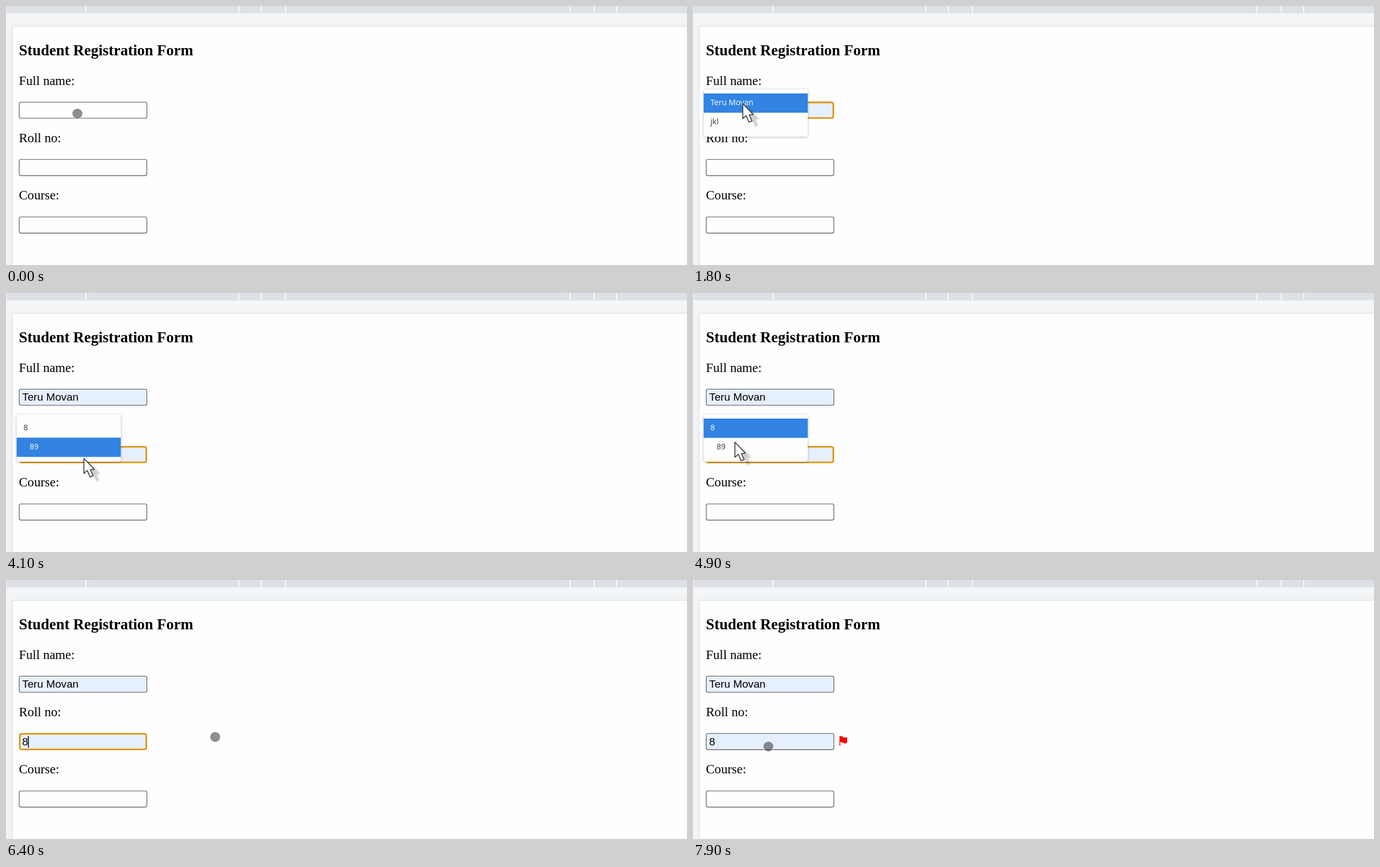
Animation of 1211x462 px, one loop 8000 ms. Source, as an HTML page with a canvas:

```html
<!DOCTYPE html>
<html lang="en">
<head>
<meta charset="utf-8">
<title>Student Registration Form</title>
<style>
  html, body { margin: 0; width: 100%; height: 100%; overflow: hidden; }
  canvas { display: block; }
</style>
</head>
<body>
<canvas id="stage" width="1211" height="462"></canvas>
<script>
const ctx = document.getElementById('stage').getContext('2d');
const LOOP = 8000, STEP = 100;
const SERIF = '"Liberation Serif", serif';
const SANS = '"Liberation Sans", sans-serif';
const MENU = '"Noto Sans", sans-serif';
const NAME = 'Teru Movan';
const FIELD_TOPS = [171.5, 273.8, 376.3];

// Pointer path: time, x, y
const PATH = [
  [0, 127, 192], [1700, 127, 192], [1800, 88, 174], [1900, 73, 173],
  [2500, 73, 173], [2900, 138, 294], [4100, 138, 295], [4200, 110, 276],
  [4400, 110, 276], [4500, 74, 271], [4800, 74, 271], [4900, 74, 266],
  [5100, 42, 237], [5700, 42, 237], [6000, 291, 254], [6100, 291, 254],
  [6200, 372, 280], [7000, 372, 280], [7200, 310, 271], [7500, 144, 306],
  [7800, 144, 306], [7900, 134, 297]
];

const ARROW = new Path2D('M.5 0V27L6.5 21.5 11.5 33 17 31 12 20.5 19 19.5Z');
const FLAG = new Path2D('M260.5 278.5Q264 277.5 267 280T274 280V290.5Q270 292.5 267 290.5T262 289V295.5H260.5Z');

const during = (t, from, to) => t >= from && t < to;

function pointerAt(t) {
  const next = PATH.findIndex(key => key[0] > t);
  if (next < 0) return PATH.at(-1).slice(1);
  const [t0, x0, y0] = PATH[next - 1], [t1, x1, y1] = PATH[next];
  const k = (t - t0) / (t1 - t0);
  return [x0 + (x1 - x0) * k, y0 + (y1 - y0) * k];
}

function text(str, x, y, font, color = '#000') {
  ctx.font = font;
  ctx.fillStyle = color;
  ctx.fillText(str, x, y);
}

function box(x, y, w, h, r) {
  ctx.beginPath();
  ctx.roundRect(x, y, w, h, r);
}

function withShadow(color, blur, dx, dy, paint) {
  ctx.save();
  ctx.shadowColor = color;
  ctx.shadowBlur = blur;
  ctx.shadowOffsetX = dx;
  ctx.shadowOffsetY = dy;
  paint();
  ctx.restore();
}

function drawPage() {
  ctx.fillStyle = '#f3f5f7';
  ctx.fillRect(0, 0, 1211, 462);
  ctx.fillStyle = '#dde1e5';
  ctx.fillRect(1, 0, 1210, 13);
  ctx.fillStyle = '#fafbfc';
  for (const x of [141, 413, 453, 496, 1002, 1045, 1085]) ctx.fillRect(x, 0, 2, 12);

  ctx.fillStyle = '#fefefe';
  withShadow('rgba(0,0,0,.06)', 10, 0, 1, () => ctx.fillRect(11, 36, 1220, 450));
  ctx.strokeStyle = '#e0e3e6';
  ctx.lineWidth = 1;
  ctx.strokeRect(11.5, 36.5, 1220, 450);

  text('Student Registration Form', 23, 88, `bold 26.96px ${SERIF}`);
  ['Full name:', 'Roll no:', 'Course:'].forEach((label, i) =>
    text(label, 23, 140.5 + 102.4 * i, `23.04px ${SERIF}`));
}

function drawField(index, { value = '', focused, filled, caret }) {
  const y = FIELD_TOPS[index];
  box(23.5, y, 227, 28.8, 3);
  ctx.fillStyle = filled ? '#e6effd' : '#fefefe';
  ctx.fill();
  if (focused) box(24.5, y + .5, 225, 27.8, 3);
  ctx.strokeStyle = focused ? '#de9610' : '#505052';
  ctx.lineWidth = focused ? 2.8 : 1.1;
  ctx.stroke();
  const font = `19.2px ${SANS}`;
  text(value, 28.8, Math.round(y + 20.8), font);
  if (caret) {
    ctx.fillRect(Math.round(28.8 + ctx.measureText(value).width), Math.round(y + 4), 1.5, 21);
  }
}

function drawMenu(top, items, active) {
  ctx.fillStyle = '#fefefe';
  box(19, top, 185, 84.5, 4);
  withShadow('rgba(0,0,0,.28)', 5, 0, 1, () => ctx.fill());
  items.forEach(([label, x], i) => {
    const y = top + 7.5 + 34.4 * i;
    if (i === active) {
      ctx.fillStyle = '#3283e2';
      ctx.fillRect(19, Math.round(y), 185, 34.4);
    }
    text(label, x, Math.round(y + 20.8), `13.85px ${MENU}`, i === active ? '#f1f6fd' : '#444');
  });
}

function drawPointer(x, y, isArrow) {
  if (!isArrow) {
    ctx.beginPath();
    ctx.arc(x, y, 9, 0, 7);
    ctx.fillStyle = 'rgba(60,60,62,.58)';
    ctx.fill();
    ctx.beginPath();
    ctx.arc(x, y, 9.6, 0, 7);
    ctx.strokeStyle = 'rgba(255,255,255,.7)';
    ctx.lineWidth = 1.2;
    ctx.stroke();
    return;
  }
  ctx.save();
  ctx.translate(x, y);
  ctx.fillStyle = '#fefefe';
  withShadow('rgba(60,60,60,.25)', 3, 11, 8, () => ctx.fill(ARROW));
  ctx.strokeStyle = '#333338';
  ctx.lineWidth = 1.6;
  ctx.lineJoin = 'round';
  ctx.stroke(ARROW);
  ctx.restore();
}

function draw(t) {
  const blinkOn = since => Math.floor((t - since) / 500) % 2 === 0;
  const nameSet = t >= 2200, rollSet = t >= 5400;
  const nameFocused = during(t, 700, 3500), rollFocused = during(t, 3500, 7000);

  drawPage();
  drawField(0, {
    value: nameSet ? NAME : '',
    focused: nameFocused,
    filled: t >= 1800,
    caret: nameFocused && nameSet && blinkOn(2200)
  });
  drawField(1, {
    value: rollSet ? '8' : '',
    focused: rollFocused,
    filled: t >= 4100,
    caret: rollFocused && rollSet && blinkOn(5400)
  });
  drawField(2, {});

  if (t >= 7000) {
    ctx.fillStyle = '#f00';
    ctx.fill(FLAG);
  }
  if (during(t, 700, 2200)) {
    drawMenu(148.5, [[NAME, 31], ['jkl', 31]], t >= 1800 ? 0 : -1);
  }
  if (during(t, 3500, 5400)) {
    drawMenu(216.5, [['8', 31], ['89', 42]], t >= 4900 ? 0 : t >= 4100 ? 1 : -1);
  }
  drawPointer(...pointerAt(t), during(t, 700, 2200) || during(t, 3300, 5400));
}

function tick() {
  const t = performance.now() % LOOP;
  draw(Math.floor(t / STEP) * STEP);
  requestAnimationFrame(tick);
}
tick();
</script>
</body>
</html>
```
